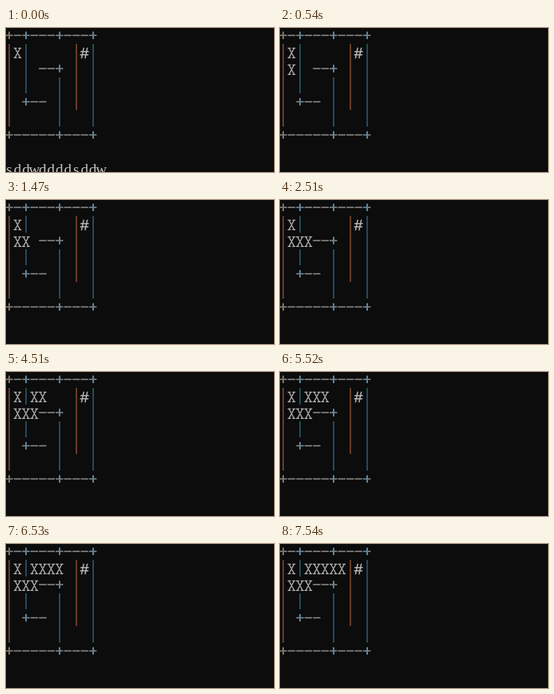
Write an HTML page that moves like this. It is 335 px wide and 181 px high and loops after 8000 ms.

```html
<!DOCTYPE html>
<html lang="en">
<head>
<meta charset="utf-8">
<title>Terminal maze</title>
<style>
html, body { margin: 0; width: 100%; height: 100%; overflow: hidden; background: #0c0c0c; }
svg { display: block; }
text { fill: #c4c4c4; text-anchor: middle; }
.goal { font: 19.5px "Liberation Mono", monospace; stroke: #c4c4c4; stroke-width: 0.3; }
.typed { font: 19px "Liberation Serif", serif; animation: typed 8s step-end infinite; }
.mark path { fill: none; stroke: #b4b4b4; stroke-width: 1.3; }
.step { visibility: hidden; animation: 8s step-end infinite; }
@keyframes typed { 6.75%, 100% { visibility: hidden } }
@keyframes step1 { 0% { visibility: hidden } 6.75%, 100% { visibility: visible } }
@keyframes step2 { 0% { visibility: hidden } 18.375%, 100% { visibility: visible } }
@keyframes step3 { 0% { visibility: hidden } 31.375%, 100% { visibility: visible } }
@keyframes step4 { 0% { visibility: hidden } 43.75%, 100% { visibility: visible } }
@keyframes step5 { 0% { visibility: hidden } 56.375%, 100% { visibility: visible } }
@keyframes step6 { 0% { visibility: hidden } 69%, 100% { visibility: visible } }
@keyframes step7 { 0% { visibility: hidden } 81.5%, 100% { visibility: visible } }
@keyframes step8 { 0% { visibility: hidden } 94.25%, 100% { visibility: visible } }
</style>
</head>
<body>
<svg id="screen" width="335" height="181" viewBox="0 0 335 181"></svg>
<script>
const screen = document.getElementById('screen');
const maze = [
  '+-+---+---+',
  '| |     |#|',
  '| | --+ | |',
  '| |   | | |',
  '| +-- | | |',
  '|     |   |',
  '+-----+---+'
];
// [column, row] of the start and each following step
const trail = [[1, 1], [1, 2], [2, 2], [3, 2], [3, 1], [4, 1], [5, 1], [6, 1], [7, 1]];
const keys = 'sddwddddsddw';

const midX = col => 4 + 10.46 * col;
const midY = row => 9.3 + 20.85 * row;
const topY = row => Math.round(20.85 * row - 1);

function add(parent, tag, attrs, content = '') {
  const el = document.createElementNS('http://www.w3.org/2000/svg', tag);
  for (const name in attrs) el.setAttribute(name, attrs[name]);
  el.textContent = content;
  return parent.appendChild(el);
}

function bar(x, y, width, height, fill) {
  add(screen, 'rect', { x, y, width, height, fill });
}

function drawCell(char, col, row) {
  const x = midX(col);
  const y = midY(row);
  const top = topY(row);
  const left = Math.round(x) - 1;
  const warm = col === 0 || col === 8;
  if (char === '|') bar(left, top, 2, topY(row + 1) - top, warm ? '#693a26' : '#224a5b');
  if (char === '-') bar(x - 4.7, y - 0.8, 9.4, 1.6, '#858585');
  if (char === '+') {
    bar(x - 4.7, y - 0.8, 9.4, 1.6, '#858585');
    bar(left, y - 4.7, 2, 9.4, warm ? '#857058' : '#5784a0');
  }
  if (char === '#') add(screen, 'text', { class: 'goal', x, y: top + 17.5 }, char);
}

function drawMark([col, row], i) {
  const mark = add(screen, 'g', {
    class: i ? 'mark step' : 'mark',
    style: i ? `animation-name: step${i}` : '',
    transform: `translate(${midX(col)} ${topY(row) + 11.3})`
  });
  // The mark takes the place of the wall in its cell
  add(mark, 'rect', { x: -5, y: -11.3, width: 10, height: 21, fill: '#0c0c0c' });
  add(mark, 'path', {
    d: 'M-4.8-6h3.8M1-6h3.8M-4.8 6h3.8M1 6h3.8M-3.2-6L3.2 6M3.2-6L-3.2 6'
  });
}

maze.forEach((line, row) => [...line].forEach((char, col) => drawCell(char, col, row)));
trail.forEach(drawMark);
add(screen, 'text', {
  class: 'typed',
  x: [...keys].map((_, col) => midX(col)).join(' '),
  y: 184
}, keys);
</script>
</body>
</html>
```
